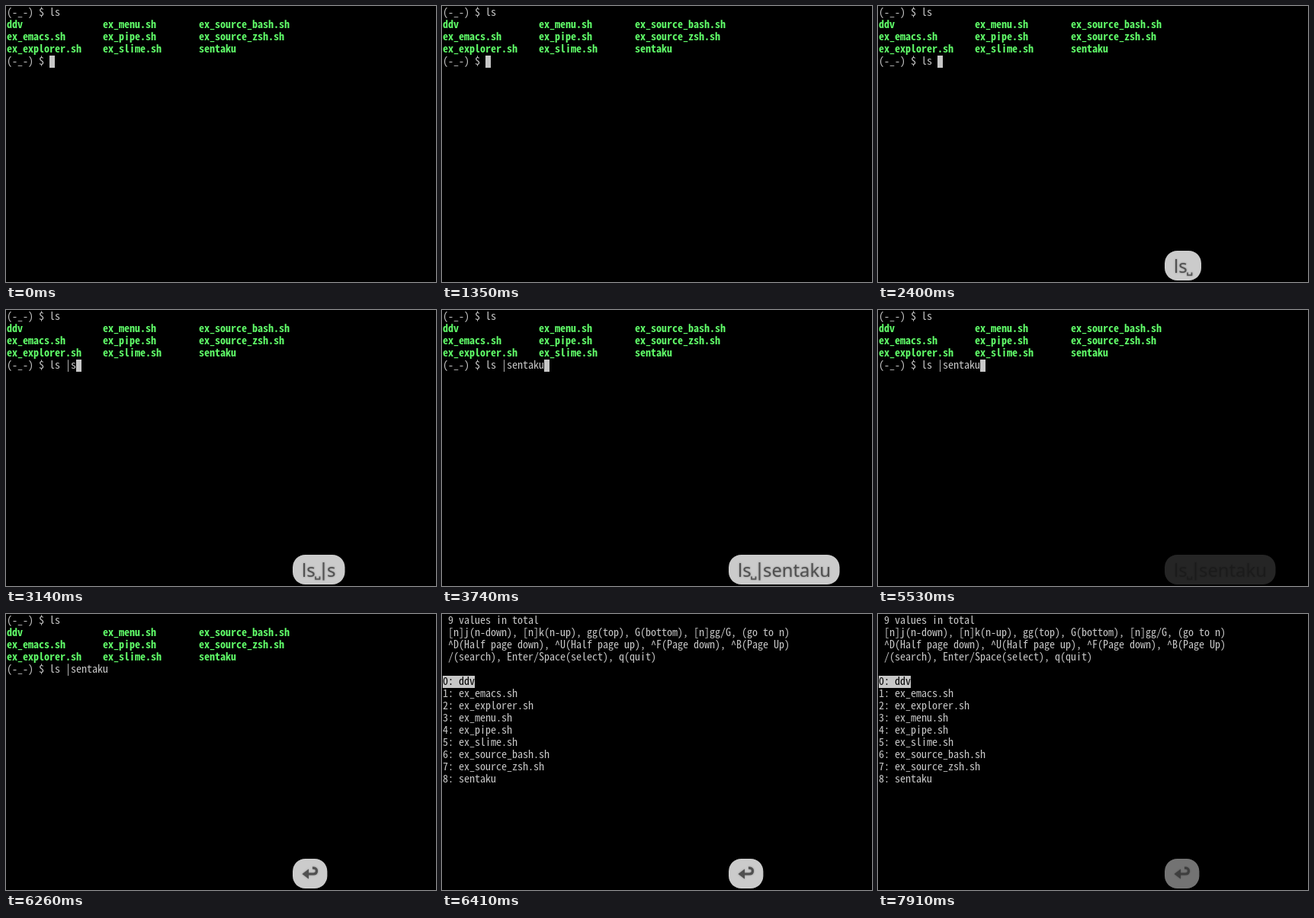
These frames come from a looping animation (564 px wide and 362 px high, 8000 ms). An HTML page:

```html
<!DOCTYPE html>
<html lang="en">
<head>
<meta charset="utf-8">
<title>Terminal list picker</title>
<style>
  html, body { margin: 0; width: 100%; height: 100%; overflow: hidden; background: #000; }
  svg { display: block; width: 564px; height: 362px; }
  .term { font-family: "Noto Sans Mono CJK JP", "Noto Sans Mono", monospace; fill: #c7c7c7; }
  .term text { white-space: pre; }
  .term .exec { fill: #5ffa68; font-weight: bold; }
  .term .selected { fill: #000; }
  #glyphs { font: 500 23.8px "Noto Sans", "Open Sans", sans-serif; fill: #505050;
            filter: drop-shadow(0 0 1px rgba(60, 60, 60, .5)); }
  .line { fill: none; stroke: #505050; }
</style>
</head>
<body>
<svg viewBox="0 0 564 362">
  <rect width="564" height="362"/>
  <g id="shell" class="term">
    <rect id="cursor" y="65" width="7" height="16"/>
  </g>
  <g id="picker" class="term">
    <rect x="1" y="81" width="42" height="16"/>
  </g>
  <g id="bubble">
    <rect id="plate" x="376" y="321" height="39" rx="16.5" fill="#cbcbcb"/>
    <g id="glyphs">
      <g id="typed">
        <text x="388" y="350">ls</text>
        <path id="space" class="line" stroke-width="1.6" d="M406 349.5V353H411.5V349.5"/>
        <path id="pipe" class="line" stroke-width="2" d="M416.5 331V354.5"/>
        <text id="word" x="421" y="350"></text>
      </g>
      <g id="enter">
        <path d="M388.5 341L397 334.5V347.5Z"/>
        <path class="line" stroke-width="3.2" d="M396 341H403Q407.5 341 407.5 337Q407.5 333 402 333"/>
      </g>
    </g>
  </g>
</svg>
<script>
const LOOP = 8000, CELL_W = 7, CELL_H = 16;
const COMMAND = "ls |sentaku", PROMPT_COL = 8, ENTER = -1;
const el = id => document.getElementById(id);
const show = (node, on) => { node.style.display = on ? "" : "none"; };

// Size the terminal font so that one character fills one cell.
const pen = document.createElement("canvas").getContext("2d");
pen.font = '100px "Noto Sans Mono CJK JP", "Noto Sans Mono", monospace';
const fontSize = CELL_W * 100 / pen.measureText("m").width;
document.querySelectorAll(".term").forEach(g => { g.style.fontSize = fontSize + "px"; });

function put(parent, col, row, string, className = "") {
  const text = document.createElementNS("http://www.w3.org/2000/svg", "text");
  text.setAttribute("x", 1 + col * CELL_W);
  text.setAttribute("y", 13 + row * CELL_H);
  text.setAttribute("class", className);
  text.textContent = string;
  parent.append(text);
  return text;
}

const files = ["ddv", "ex_emacs.sh", "ex_explorer.sh", "ex_menu.sh", "ex_pipe.sh",
  "ex_slime.sh", "ex_source_bash.sh", "ex_source_zsh.sh", "sentaku"];
const help = ["9 values in total",
  "[n]j(n-down), [n]k(n-up), gg(top), G(bottom), [n]gg/G, (go to n)",
  "^D(Half page down), ^U(Half page up), ^F(Page down), ^B(Page Up)",
  "/(search), Enter/Space(select), q(quit)"];

put(el("shell"), 0, 0, "(-_-) $ ls");
put(el("shell"), 0, 4, "(-_-) $");
const commandLine = put(el("shell"), PROMPT_COL, 4, "");
files.forEach((name, i) => {
  put(el("shell"), Math.floor(i / 3) * 18, 1 + i % 3, name, "exec");
  put(el("picker"), 0, 5 + i, `${i}: ${name}`, i ? "" : "selected");
});
help.forEach((line, row) => put(el("picker"), 1, row, line));

// Each step changes only the fields it names.
const steps = [
  [0, { chars: 0, cursor: true, keys: 0, right: 417, alpha: 0, picker: false }],
  [300, { cursor: false }],
  [1350, { cursor: true }],
  [1800, { chars: 2, keys: 2, right: 417, alpha: 1 }],
  [2400, { chars: 3, keys: 3, right: 424 }],
  [2840, { keys: 4, right: 433 }],
  [2990, { chars: 4 }],
  [3140, { chars: 5, keys: 5, right: 444.5 }],
  [3290, { chars: 6, keys: 6, right: 458 }],
  [3440, { chars: 7, keys: 7, right: 472 }],
  [3590, { chars: 9, keys: 9, right: 494 }],
  [3740, { chars: 11, keys: 11, right: 521.5 }],
  [5240, { alpha: .88 }],
  [5380, { alpha: .56 }],
  [5530, { alpha: .18 }],
  [5670, { alpha: 0 }],
  [5820, { cursor: false }],
  [6260, { keys: ENTER, right: 421.4, alpha: 1 }],
  [6410, { picker: true }],
  [7760, { alpha: .88 }],
  [7910, { alpha: .57 }],
];

function render(time) {
  const state = {};
  for (const [start, change] of steps) if (start <= time) Object.assign(state, change);
  const { chars, cursor, keys, right, alpha, picker } = state;

  show(el("shell"), !picker);
  show(el("picker"), picker);
  commandLine.textContent = COMMAND.slice(0, chars);
  show(el("cursor"), cursor);
  el("cursor").setAttribute("x", 1 + (PROMPT_COL + chars) * CELL_W);

  show(el("bubble"), alpha > 0);
  el("bubble").style.opacity = alpha;
  el("glyphs").style.opacity = Math.sqrt(alpha);
  el("plate").setAttribute("width", right - 376);
  show(el("enter"), keys === ENTER);
  show(el("typed"), keys !== ENTER);
  show(el("space"), keys > 2);
  show(el("pipe"), keys > 3);
  el("word").textContent = COMMAND.slice(4, Math.max(4, keys));
}

const begin = performance.now();
function frame() {
  render((performance.now() - begin) % LOOP);
  requestAnimationFrame(frame);
}
frame();
</script>
</body>
</html>
```
